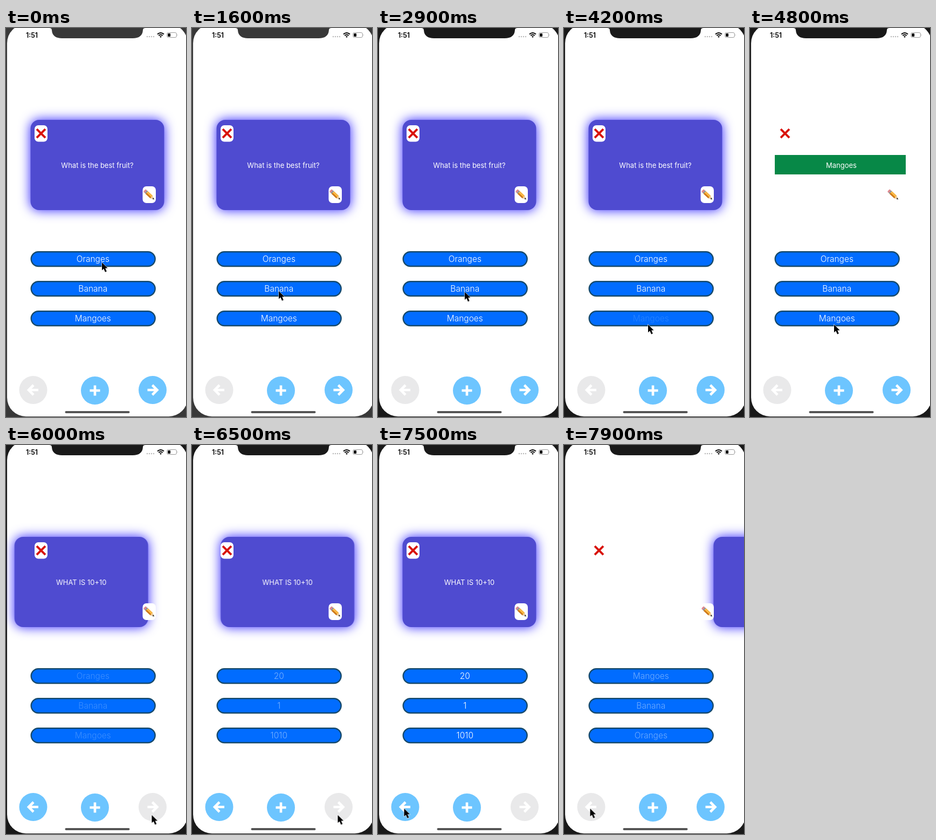
Animation of 334 by 720 pixels, one loop 8 s. Source, as an HTML page:

```html
<!DOCTYPE html>
<html lang="en">
<head>
<meta charset="utf-8">
<title>Flashcards</title>
<style>
  html, body { margin: 0; width: 100%; height: 100%; overflow: hidden; background: #383838; }
  svg { display: block; width: 334px; height: 720px; }
  text { font-family: Inter, Roboto, sans-serif; fill: #fff; text-anchor: middle; }
  .title { font-size: 15.5px; font-weight: 300; }
  .card-text { font-size: 13px; }
  .clock { font-size: 12.5px; font-weight: 600; fill: #000; }
  .pill { fill: #016cff; stroke: #174a6b; stroke-width: 2.4; }
  .icon { fill: none; stroke: #fff; stroke-width: 4.6; }
  .cell { fill: #fff; }
  .bezel { fill: #383838; }
  #glow { filter: blur(10.5px); }
  #flip { transform-origin: 169.5px 253.5px; }
</style>
</head>
<body>
<svg viewBox="0 0 334 720">
  <rect class="bezel" width="334" height="720"/>
  <rect x="2" y="-7" width="335" height="726" rx="35" fill="#fff"/>

  <g id="slide">
    <g id="flip">
      <g id="front">
        <rect id="glow" x="45.5" y="170" width="248" height="167" rx="16" fill="#2c20ff"/>
        <rect x="45.5" y="170" width="248" height="167" rx="16" fill="#4f4bd0"/>
        <text id="fruit" class="card-text" x="169.5" y="258.5">What is the best fruit?</text>
        <text id="sum" class="card-text" x="169.5" y="258.5">WHAT IS 10+10</text>
      </g>
      <g id="back">
        <rect x="46" y="235" width="243" height="36" fill="#078847"/>
        <text class="card-text" x="169.5" y="258.5">Mangoes</text>
      </g>
    </g>
  </g>

  <rect class="cell" x="53" y="180" width="24" height="30.5" rx="7"/>
  <path d="M57 187.2L73 203.2M73 187.2L57 203.2" stroke="#d9140d" stroke-width="4"/>
  <rect class="cell" x="253.5" y="293" width="24.5" height="31" rx="7"/>
  <g transform="translate(257.6 301.2) rotate(43)">
    <rect x="-1" y="-3.2" width="4" height="6.4" rx="1.6" fill="#e08a90"/>
    <rect x="2.5" y="-3.2" width="2.5" height="6.4" fill="#8d959c"/>
    <rect x="5" y="-3.2" width="12" height="6.4" fill="#f3a62c"/>
    <path d="M5 3.2V1H17V3.2Z" fill="#c9741b"/>
    <path d="M5 -1.1H17" stroke="#ffd067" stroke-width="1"/>
    <path d="M17 -3.2L23.5 0L17 3.2Z" fill="#eccb9b"/>
    <path d="M20.6 -1.6L24 0L20.6 1.6Z" fill="#2b2b2b"/>
  </g>

  <g id="answers"></g>

  <circle id="prev" cx="50.5" cy="670" r="26"/>
  <path class="icon" d="M42 670H60M51 661L42 670L51 679"/>
  <circle cx="165" cy="671" r="26" fill="#6dc5ff"/>
  <path class="icon" d="M155.5 671H174.5M165 661.5V680.5" stroke-width="5"/>
  <circle id="next" cx="272" cy="670" r="26"/>
  <path class="icon" d="M262.5 670H280.5M271.5 661L280.5 670L271.5 679"/>

  <path class="bezel" d="M80 0Q85 0 85 4Q86 19 104 19H235Q253 19 254 4Q254 0 259 0Z"/>
  <text class="clock" x="48" y="17.5">1:51</text>
  <g fill="#b9b9b9">
    <circle cx="262" cy="16" r="1.2"/><circle cx="266" cy="16" r="1.2"/>
    <circle cx="270" cy="16" r="1.2"/><circle cx="274" cy="16" r="1.2"/>
  </g>
  <g fill="none" stroke="#000" stroke-width="2">
    <path d="M281 11.6Q287 6.4 293 11.6M283.3 14Q287 10.9 290.7 14"/>
    <path d="M287 18L285 15.7Q287 14.2 289 15.7Z" fill="#000" stroke="none"/>
  </g>
  <rect x="298.8" y="8.5" width="17.6" height="9" rx="2.5" fill="none" stroke="#999"/>
  <rect x="300.3" y="10" width="4.8" height="6" rx="1" fill="#000"/>
  <path d="M317.8 11.2Q319.3 13 317.8 14.8Z" fill="#999"/>
  <rect x="109.5" y="709" width="120" height="4" rx="2" fill="#555"/>

  <path id="cursor" d="M0 0V14.6L3.3 11.6L6 17.8L8.8 16.6L6.2 10.6H10.6Z"
        stroke="#fff" stroke-width="1.1" paint-order="stroke"/>
</svg>
<script>
const LOOP = 8000;
const NEXT_TAP = 5935, NEXT_SWAP = 6235, PREV_TAP = 7700;
const $ = id => document.getElementById(id);

// Steps are [ms, value, easing]; a step without easing holds its value.
function play(el, prop, steps) {
  const frames = steps.map(([ms, value, easing = "step-end"]) =>
    ({ offset: ms / LOOP, [prop]: value, easing }));
  const last = frames[frames.length - 1];
  if (last.offset < 1) frames.push({ offset: 1, [prop]: last[prop] });
  el.animate(frames, { duration: LOOP, iterations: Infinity });
}

function add(parent, tag, attrs, text = "") {
  const el = document.createElementNS("http://www.w3.org/2000/svg", tag);
  for (const key in attrs) el.setAttribute(key, attrs[key]);
  el.textContent = text;
  return parent.appendChild(el);
}

const move = "ease-in-out";
const shift = x => `translateX(${x}px)`;
play($("slide"), "transform", [
  [0, shift(0)], [NEXT_TAP, shift(0), move],
  [NEXT_SWAP, shift(-300)], [NEXT_SWAP, shift(300), move],
  [NEXT_SWAP + 300, shift(0)], [PREV_TAP, shift(0), move], [LOOP, shift(300)]
]);
play($("flip"), "transform", [
  [0, "scaleX(1)"], [4400, "scaleX(1)", "ease-in"],
  [4550, "scaleX(0)", "ease-out"], [4700, "scaleX(1)"]
]);
play($("front"), "opacity", [[0, 1], [4550, 0], [NEXT_TAP, 1]]);
play($("back"), "opacity", [[0, 0], [4550, 1], [NEXT_TAP, 0]]);
play($("fruit"), "opacity", [[0, 1], [NEXT_TAP, 0], [PREV_TAP, 1]]);
play($("sum"), "opacity", [[0, 0], [NEXT_TAP, 1], [PREV_TAP, 0]]);

const on = "#6dc5ff", off = "#e9e9ea";
play($("prev"), "fill", [[0, off], [NEXT_TAP, on], [PREV_TAP, off]]);
play($("next"), "fill", [[0, on], [NEXT_TAP, off], [PREV_TAP, on]]);

for (const el of document.querySelectorAll(".bezel"))
  play(el, "fill", [[0, "#383838"], [1700, "#191919"]]);

const titleSets = [
  ["Oranges", "Banana", "Mangoes"],
  ["20", "1", "1010"],
  ["Mangoes", "Banana", "Oranges"]
];
const fades = [
  [[0, 1], [NEXT_TAP - 5, 1, "linear"], [6022, 0]],
  [[0, 0], [6370, 0, "linear"], [6650, 1], [PREV_TAP, 1, "linear"], [7790, 0]],
  [[0, 0], [7810, 0, "linear"], [LOOP, 0.9]]
];
const press = [[4060, 0.15], [4250, 0.15, "linear"], [4420, 1]];

for (let row = 0; row < 3; row++) {
  const y = 427.5 + row * 55;
  add($("answers"), "rect", { class: "pill", x: 46.7, y: y - 13.3, width: 230, height: 26.8, rx: 13.4 });
  titleSets.forEach((set, i) => {
    const label = add($("answers"), "text", { class: "title", x: 161.3, y: y + 5.6 }, set[row]);
    const [first, ...rest] = fades[i];
    play(label, "opacity", i === 0 && row === 2 ? [first, ...press, ...rest] : fades[i]);
  });
}

const at = (x, y) => `translate(${x}px, ${y}px)`;
const oranges = at(178, 434), banana = at(161, 487), mangoes = at(156, 549);
const forward = at(270.5, 685), backward = at(48.5, 673);
play($("cursor"), "transform", [
  [0, oranges], [800, oranges, move], [1500, banana],
  [2800, banana, move], [3700, mangoes],
  [4900, mangoes, move], [5700, forward],
  [6700, forward, move], [7500, backward]
]);
</script>
</body>
</html>
```
